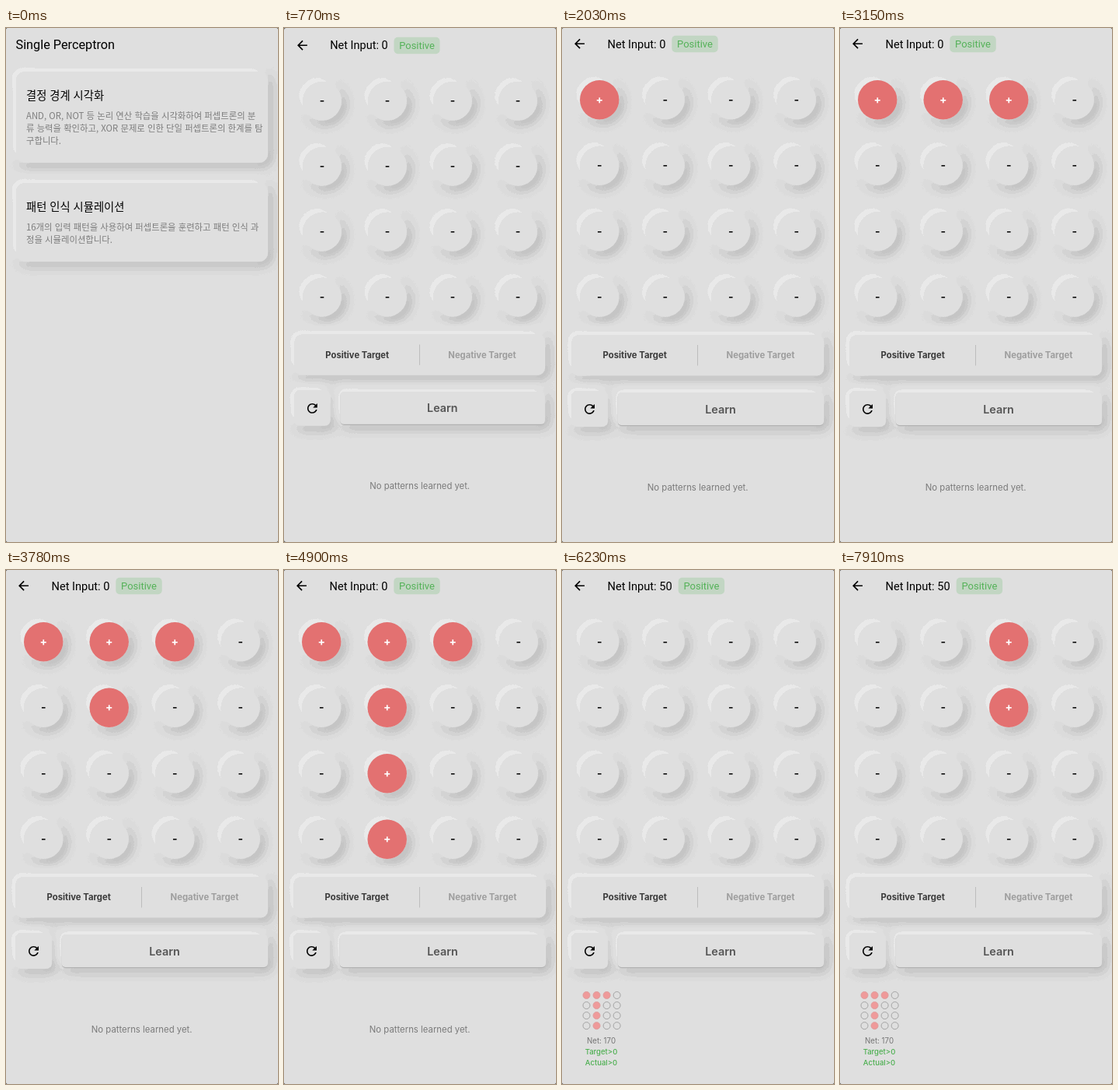
Write an HTML page that moves like this. It is 350 px wide and 660 px high and loops after 8000 ms.

```html
<!DOCTYPE html>
<html lang="ko">
<head>
<meta charset="utf-8">
<title>Single Perceptron</title>
<style>
  html, body { margin: 0; width: 100%; height: 100%; overflow: hidden; background: #555; }
  svg { display: block; width: 350px; height: 660px; background: #dfdfdf; border-radius: 3px; }
  text { font-family: Inter, sans-serif; }
  .roboto { font-family: Roboto, sans-serif; }
  .korean { font-family: "Noto Sans CJK KR", "Noto Sans CJK", "Noto Sans KR", sans-serif; }
  .body { font-size: 11.36px; fill: #7d7d7d; }
  .mid { text-anchor: middle; }
  .sign { font-size: 14px; font-weight: 700; }
  .target { font-size: 11.3px; font-weight: 700; }
</style>
</head>
<body>
<svg id="stage" viewBox="0 0 350 660"></svg>
<script>
const LOOP = 8000;
const PAGE_OPEN = 770, LEARN = 5810;
const PITCH = 84.5, RADIUS = 25.2;
const cells = Array.from({ length: 16 }, (_, i) => ({ col: i % 4, row: i >> 2 }));

// [cell, time switched on, time switched off]
const presses = [
  [0, 2030, LEARN], [1, 2520, LEARN], [2, 3150, LEARN],
  [5, 3780, LEARN], [9, 4410, LEARN], [13, 4900, LEARN],
  [2, 7420, LOOP], [6, 7910, LOOP]
];
const learned = presses.filter(p => p[2] === LEARN).map(p => p[0]);

// Soft shadows are reduced to a few flat grey bands.
const bands = [[201, 197], [207, 203], [215, 212], [222, 219], [233, 223], [256, 233]];
const bandTable = Array.from({ length: 256 }, (_, v) =>
  (bands.find(([limit]) => v < limit)[1] / 255).toFixed(3)).join(' ');
const bandFuncs = ['R', 'G', 'B'].map(c =>
  `<feFunc${c} type="discrete" tableValues="${bandTable}"/>`).join('');

const text = (x, y, content, attrs = '') => `<text x="${x}" y="${y}" ${attrs}>${content}</text>`;
const box = (x, y, w, h, r, attrs) =>
  `<rect x="${x}" y="${y}" width="${w}" height="${h}" rx="${r}" ${attrs}/>`;

function raised(x, y, w, h, r) {
  const shadow = (shift, color) => box(x + shift - .8, y + shift - .8, w + 1.6, h + 1.6, r + .8,
    `fill="${color}" filter="url(#soft)"`);
  return shadow(3.3, '#9e9e9e') + shadow(-3.3, '#fff') + box(x, y, w, h, r, 'fill="#e0e0e0"');
}
const relief = shapes =>
  `<g filter="url(#bands)"><rect width="350" height="660" fill="#e0e0e0"/>${shapes}</g>`;

const center = i => [48.25 + cells[i].col * PITCH, 92.2 + cells[i].row * PITCH];
const sign = (i, symbol, color) => {
  const [x, y] = center(i);
  return text(x, y + 4.6, symbol, `class="mid sign" fill="${color}"`);
};
const pressed = ([i]) => {
  const [x, y] = center(i);
  return `<g class="press"><circle cx="${x}" cy="${y}" r="${RADIUS}" fill="#e37171"/>${sign(i, '+', '#fff')}</g>`;
};
const dot = ({ col, row }, i) => {
  const [fill, stroke] = learned.includes(i) ? ['#ef9a9a', '#dc9a9a'] : ['none', '#9e9e9e'];
  return `<circle cx="${31.5 + col * 13.05}" cy="${546 + row * 13.05}" r="4.5" ` +
    `fill="${fill}" stroke="${stroke}" stroke-width=".9"/>`;
};
const icon = (x, y, d) => `<path transform="translate(${x} ${y}) scale(.81)" d="${d}"/>`;

const menu = relief(raised(13, 56, 324, 117, 11) + raised(13, 199, 324, 101, 11)) +
  text(12.5, 27, 'Single Perceptron', 'class="roboto" font-size="16.25"') +
  text(26, 92, '결정 경계 시각화', 'class="korean" font-size="14.3"') +
  ['AND, OR, NOT 등 논리 연산 학습을 시각화하여 퍼셉트론의 분',
   '류 능력을 확인하고, XOR 문제로 인한 단일 퍼셉트론의 한계를 탐',
   '구합니다.'].map((s, i) => text(26, 117 + i * 16.2, s, 'class="korean body"')).join('') +
  text(26, 235, '패턴 인식 시뮬레이션', 'class="korean" font-size="14.3"') +
  ['16개의 입력 패턴을 사용하여 퍼셉트론을 훈련하고 패턴 인식 과',
   '정을 시뮬레이션합니다.'].map((s, i) => text(26, 259.7 + i * 16.2, s, 'class="korean body"')).join('');

const buttons = cells.map((_, i) => {
  const [x, y] = center(i);
  return raised(x - RADIUS, y - RADIUS, 2 * RADIUS, 2 * RADIUS, RADIUS);
}).join('');

const trainer = relief(buttons + raised(12.5, 394, 324.5, 52.5, 9) +
    raised(12, 466, 47, 46, 7) + raised(71.5, 468, 265.5, 42.4, 6)) +
  icon(12.8, 10.5, 'M20 11H7.83l5.59-5.59L12 4l-8 8 8 8 1.41-1.41L7.83 13H20v-2z') +
  text(58.5, 25.5, '', 'id="net" class="roboto" font-size="14.6"') +
  `<g id="chip">${box(141.3, 9.7, 59.4, 21.6, 5, 'fill="#c2d6c3"')}` +
  text(171, 25, 'Positive', 'class="roboto mid" font-size="13" fill="#55b259"') + '</g>' +
  cells.map((_, i) => sign(i, '-', '#111')).join('') +
  presses.map(pressed).join('') +
  text(93.7, 424.3, 'Positive Target', 'class="mid target" fill="#3a3a3a"') +
  text(255.5, 424.3, 'Negative Target', 'class="mid target" fill="#9e9e9e"') +
  '<path d="M174.5 407V433.5" stroke="#bdbdbd"/>' +
  icon(25.8, 479.7, 'M17.65 6.35C16.2 4.9 14.21 4 12 4c-4.42 0-7.99 3.58-7.99 8s3.57 8 7.99 8c3.73 0 6.84-2.55 7.73-6h-2.08c-.82 2.33-3.04 4-5.65 4-3.31 0-6-2.69-6-6s2.69-6 6-6c1.66 0 3.14.69 4.22 1.78L13 11h7V4l-2.35 2.35z') +
  box(71.8, 468.8, 265, 42.4, 5, 'fill="#b2b2b2"') +
  box(71.5, 468, 265.5, 42, 5, 'fill="#dfdfdf"') +
  box(71.5, 468, 265.5, 42, 5, 'id="tap" opacity=".03"') +
  text(204, 494.5, 'Learn', 'class="mid" font-size="14.4" font-weight="600" fill="#555"') +
  text(174.7, 594, 'No patterns learned yet.', 'id="empty" class="mid" font-size="11.35" fill="#7a7a7a"') +
  `<g id="history">${cells.map(dot).join('')}` +
  text(50.5, 608.3, 'Net: 170', 'class="mid" font-size="9.7" fill="#757575"') +
  text(50.5, 622.4, 'Target&gt;0', 'class="mid" font-size="9.5" font-weight="500" fill="#4caf50"') +
  text(50.5, 636.4, 'Actual&gt;0', 'class="mid" font-size="9.5" font-weight="500" fill="#4caf50"') + '</g>';

document.getElementById('stage').innerHTML = `<defs>
  <filter id="soft" x="-60%" y="-60%" width="220%" height="220%" color-interpolation-filters="sRGB">
    <feGaussianBlur stdDeviation="7.4"/></filter>
  <filter id="bands" filterUnits="userSpaceOnUse" x="0" y="0" width="350" height="660"
    color-interpolation-filters="sRGB"><feComponentTransfer>${bandFuncs}</feComponentTransfer></filter>
  </defs><g id="menu">${menu}</g><g id="trainer">${trainer}</g>`;

const el = id => document.getElementById(id);
const show = (node, visible) => { node.style.display = visible ? '' : 'none'; };
const pressNodes = document.querySelectorAll('.press');

function render(t) {
  show(el('menu'), t < PAGE_OPEN);
  show(el('trainer'), t >= PAGE_OPEN);

  const scale = t < 840 ? .9935 : t < 910 ? .998 : 1;
  el('trainer').setAttribute('transform', `translate(175 330) scale(${scale}) translate(-175 -330)`);

  presses.forEach(([, on, off], i) => show(pressNodes[i], t >= on && t < off));

  const trained = t >= LEARN;
  const net = !trained ? 0 : t >= 7420 && t < 7910 ? 70 : 50;
  el('net').textContent = 'Net Input: ' + net;
  el('chip').setAttribute('transform', `translate(${trained ? 8.4 : 0} 0)`);
  show(el('empty'), !trained);
  show(el('history'), trained);
  show(el('tap'), trained && t < 6230);
}

const start = performance.now();
function tick() {
  render((performance.now() - start) % LOOP);
  requestAnimationFrame(tick);
}
tick();
</script>
</body>
</html>
```
